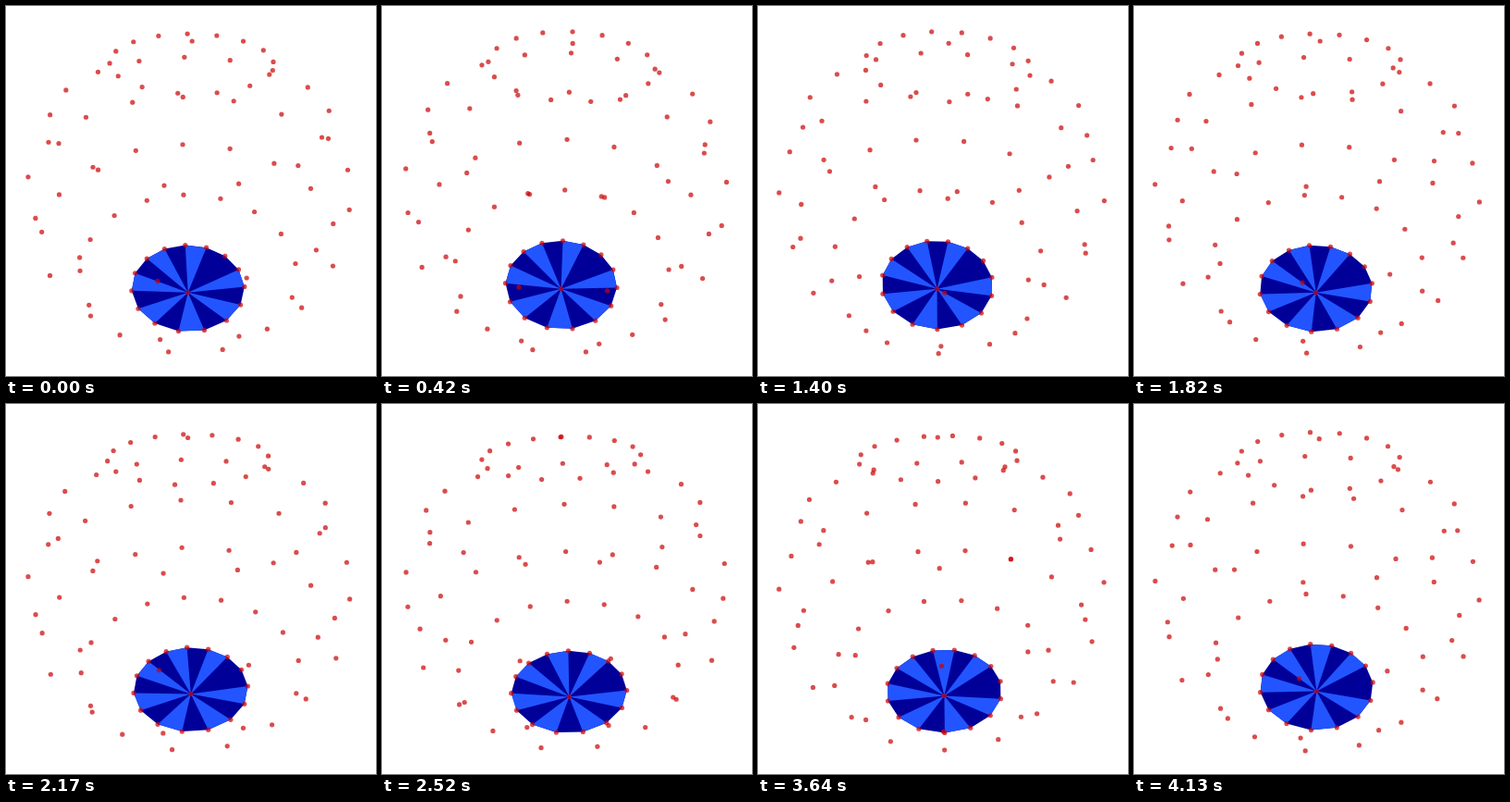
These frames come from a looping animation (400x400 px, 4.2 s). An HTML page with a canvas:

```html
<!DOCTYPE html>
<html>
<head>
<meta charset="utf-8">
<style>
html, body { margin: 0; height: 100%; overflow: hidden; background: #fff; }
canvas { display: block; }
</style>
</head>
<body>
<canvas id="stage" width="400" height="400"></canvas>
<script>
const ctx = document.getElementById('stage').getContext('2d');
const STEP = 70, FRAMES = 60;
const SEGMENTS = 15, BANDS = 7;
const SIZE = 165.5, DEPTH = 0.342;
const { sin, cos, PI } = Math;

// Returns a projector from (polar angle, segment) on the globe to the stage.
function makeProjector(frame) {
  const sway = sin(frame * 2 * PI / FRAMES + 0.21);
  const spin = 0.78 + 0.0131 * frame;
  const roll = 0.004 + 0.0437 * sway;
  const tilt = 0.9485 - 0.098 * sway;
  const height = 0.98 + 0.02 * sway;
  const centerX = 198.5, centerY = 201.1 + 1.1 * sway;
  return (polar, segment) => {
    const angle = spin + segment * 2 * PI / SEGMENTS;
    const x0 = sin(polar) * sin(angle);
    const y0 = height * cos(polar);
    const u = -sin(polar) * cos(angle);
    const x = x0 * cos(roll) - y0 * sin(roll);
    const y = y0 * cos(roll) + x0 * sin(roll);
    const scale = SIZE / (1 + DEPTH * (y * cos(tilt) - u * sin(tilt)));
    return [centerX + x * scale,
            centerY + (y * sin(tilt) + u * cos(tilt)) * scale];
  };
}

function polygon(points, color) {
  ctx.fillStyle = color;
  ctx.beginPath();
  for (const p of points) ctx.lineTo(...p);
  ctx.fill();
}

function dot([x, y]) {
  ctx.beginPath();
  ctx.arc(x, y, 2.6, 0, 2 * PI);
  ctx.fill();
}

function draw(frame) {
  const project = makeProjector(frame);
  const rings = Array.from({ length: BANDS - 1 }, (_, k) =>
    Array.from({ length: SEGMENTS }, (_, i) => project((k + 1) * PI / BANDS, i)));
  const pole = project(0, 0), rim = rings[0];
  ctx.clearRect(0, 0, 400, 400);

  polygon(rim, '#000099');
  for (let i = 1; i < SEGMENTS; i += 2)
    polygon([pole, rim[i], rim[i + 1]], '#2255ff');

  ctx.fillStyle = 'rgba(204, 0, 0, 0.7)';
  [pole, project(PI, 0), ...rings.flat()].forEach(dot);
}

const start = performance.now();
function tick() {
  draw(Math.floor((performance.now() - start) / STEP) % FRAMES);
  requestAnimationFrame(tick);
}
tick();
</script>
</body>
</html>
```
